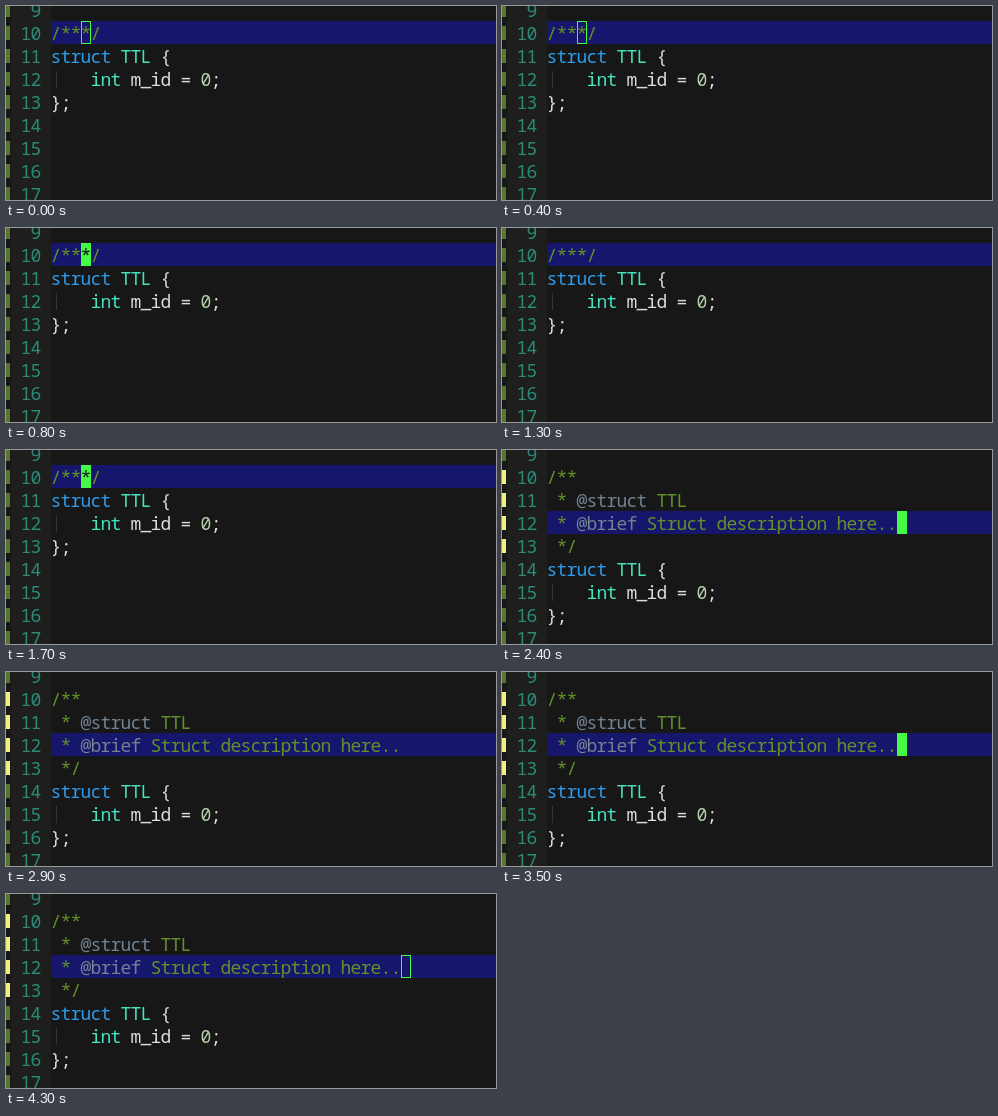
Write an HTML page with a canvas that moves like this. It is 490 px wide and 194 px high and loops after 4.4 s.

```html
<!DOCTYPE html>
<html lang="en">
<head>
<meta charset="utf-8">
<style>
html, body { margin: 0; width: 100%; height: 100%; overflow: hidden; background: #171717; }
canvas { display: block; }
</style>
</head>
<body>
<canvas id="stage" width="490" height="194"></canvas>
<script>
const ctx = document.getElementById('stage').getContext('2d');
const LOOP = 4400, CELL = 10, ROW = 23, LEFT = 45;
const color = {
  back: '#171717', gutter: '#1e1f1d', line: '#16166c', number: '#2a8b78',
  saved: '#587630', changed: '#f2f080', guide: '#343434', cursor: '#44fa44',
  comment: '#64902a', tag: '#728290', keyword: '#2f9bea', type: '#45e3bd',
  plain: '#dcdcdc', digit: '#b5d3a8'
};

const code = [
  [['struct ', 'keyword'], ['TTL ', 'type'], ['{', 'plain']],
  [['    int ', 'type'], ['m_id = ', 'plain'], ['0', 'digit'], [';', 'plain']],
  [['};', 'plain']]
];
const before = {
  lines: [[['/***/', 'comment']], ...code],
  current: 10, column: 3, guide: 12, changed: 0
};
const after = {
  lines: [
    [['/**', 'comment']],
    [[' * ', 'comment'], ['@struct', 'tag'], [' TTL', 'comment']],
    [[' * ', 'comment'], ['@brief', 'tag'], [' Struct description here..', 'comment']],
    [[' */', 'comment']],
    ...code
  ],
  current: 12, column: 35, guide: 15, changed: 4
};

// Cursor look from each moment on
const cursorStates = [
  [0, 'hollow'], [700, 'solid'], [1100, 'off'], [1500, 'solid'], [1900, 'off'],
  [2400, 'solid'], [2900, 'off'], [3300, 'solid'], [3700, 'off'], [4100, 'hollow']
];

const rowTop = n => 15 + (n - 10) * ROW;

function box(x, y, w, h, fill) {
  ctx.fillStyle = fill;
  ctx.fillRect(x, y, w, h);
}

function write(text, x, row, fill) {
  ctx.fillStyle = fill;
  [...text].forEach((ch, i) => ctx.fillText(ch, x + (i + 0.5) * CELL, rowTop(row) + 18.5));
}

function drawGutter(doc) {
  box(5, 0, 40, 194, color.gutter);
  for (let n = 9; n <= 17; n++) {
    const isChanged = n >= 10 && n < 10 + doc.changed;
    box(0, rowTop(n) + 5, 4, 14, isChanged ? color.changed : color.saved);
    const label = String(n);
    write(label, 35 - label.length * CELL, n, color.number);
  }
}

function drawLine(parts, row) {
  let column = 0;
  for (const [text, kind] of parts) {
    write(text, LEFT + column * CELL, row, color[kind]);
    column += text.length;
  }
}

function drawCursor(doc, state) {
  if (state === 'off') return;
  const x = LEFT + doc.column * CELL, y = rowTop(doc.current);
  if (state === 'solid') {
    box(x, y, CELL, ROW, color.cursor);
    const text = doc.lines[doc.current - 10].map(part => part[0]).join('');
    write(text[doc.column] || '', x, doc.current, color.back);
  } else {
    ctx.strokeStyle = color.cursor;
    ctx.lineWidth = 1;
    ctx.strokeRect(x + 0.5, y + 0.5, CELL - 1, ROW - 1);
  }
}

function draw(time) {
  const doc = time < 2400 ? before : after;
  const state = cursorStates.filter(([start]) => start <= time).pop()[1];
  ctx.font = '18px "Noto Sans Mono", monospace';
  ctx.textAlign = 'center';
  box(0, 0, 490, 194, color.back);
  drawGutter(doc);
  box(LEFT, rowTop(doc.current), 490 - LEFT, ROW, color.line);
  box(50, rowTop(doc.guide) + 4, 1, 17, color.guide);
  doc.lines.forEach((parts, i) => drawLine(parts, 10 + i));
  drawCursor(doc, state);
}

const start = performance.now();
function tick() {
  draw((performance.now() - start) % LOOP);
  requestAnimationFrame(tick);
}
tick();
</script>
</body>
</html>
```
